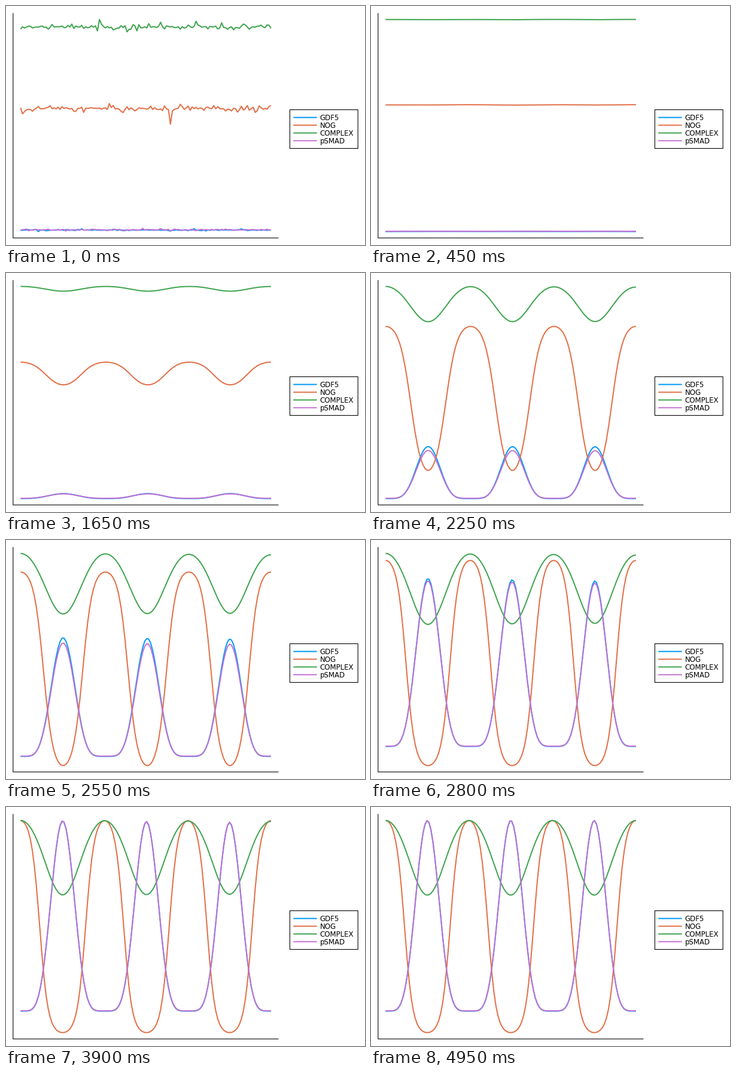
These frames come from a looping animation (600x400 px, 5050 ms). A matplotlib script:

```python
import numpy as np
import matplotlib.pyplot as plt
from matplotlib.animation import FuncAnimation
from matplotlib.patches import Rectangle

W, H, DPI = 600, 400, 100
PT = 72 / DPI                      # points per pixel
SLOT, SLOTS = 50, 101              # ms per drawn frame, frames per loop
STEP = 59.55                       # ms per simulation step
LAST = 83                          # last simulation step
N = 128
MARGIN, AXIS_END = 11.81, 455.4
PAD = 0.03 / 1.06                  # axis padding around the data

NAMES = ["GDF5", "NOG", "COMPLEX", "pSMAD"]
COLORS = ["#009AFA", "#E36F47", "#3EA44E", "#C371D2"]

left = MARGIN + PAD * (AXIS_END - MARGIN)
right = AXIS_END - PAD * (AXIS_END - MARGIN)
top = MARGIN + PAD * (H - 2 * MARGIN)
bottom = H - top
u = np.linspace(0, 1, N)
x = left + (right - left) * u

# Random start, smoothed over time by damping its cosine modes
rng = np.random.default_rng(5)
modes = np.arange(N)
basis = np.cos(np.pi * np.outer(modes + 0.5, modes) / N)


def noise_modes(reach):
    noise = rng.laplace(size=N)
    weights = basis.T @ (noise * reach / noise.max()) * 2 / N
    weights[0] = 0
    return weights


noises = [noise_modes(reach) for reach in (-2.6, 8.5, 13, 2.4)]


def residue(step, weights):
    return basis @ (weights * np.exp(-(0.2 + 0.006 * modes**2) * step))


def growth(step, level, rate, bend):
    """Saturating growth from 0 to 1, steepest around step 40."""
    t = step - 37
    return 1 / (1 + np.exp(-(level + rate * t + bend * t * t)))


def squash(c, gain, shift):
    """Bend a cosine through tanh and rescale it to 0..1."""
    low, high = np.tanh(gain * (shift - 1)), np.tanh(gain * (shift + 1))
    return (np.tanh(gain * (c + shift)) - low) / (high - low)


def levels(step):
    """Concentrations of the four species along the domain."""
    remaining = 1 - step / LAST
    grown = growth(step, -1.12, 0.283, 0.0022)
    grown_smad = growth(step, -1.23, 0.283, 0.0022)

    # The pattern starts slightly off its final place and height
    shift = 5.3 * remaining * np.sin(np.pi * u) / (right - left)
    wave = np.cos(6 * np.pi * (u - shift))
    crest = (1 + wave) / 2
    lag = remaining * grown * u
    fade = 1 - 0.055 * lag

    spot = (1 - crest) ** (1 + 1.65 * np.tanh(20 * grown)) * fade
    gdf = 354.8 * grown * spot
    smad = 0.5 + 354.8 * grown_smad * spot

    up = 143 * growth(step, 0.13, 0.2185, 0)
    down = 252 * growth(step, 0.64, 0.3155, 0.0015)
    bump = squash(wave, 0.5 + 0.95 * np.sqrt(grown), 0.62 - 0.8 * grown)
    nog = 212 - down + (up + down) * bump

    arch = crest + 0.3 * crest * (1 - crest)
    dip = 139 * growth(step, -0.3, 0.28, 0.003)
    cplx = 355 - dip * (1 - arch) * fade - 8 * lag * arch

    return np.array([v + residue(step, w)
                     for v, w in zip((gdf, nog, cplx, smad), noises)])


fig = plt.figure(figsize=(W / DPI, H / DPI), dpi=DPI, facecolor="white")
ax = fig.add_axes([0, 0, 1, 1])
ax.set_xlim(0, W)
ax.set_ylim(H, 0)
ax.axis("off")


def line(xs, ys, color, width):
    return ax.plot(xs, ys, color=color, lw=width * PT, snap=False,
                   solid_capstyle="butt", solid_joinstyle="round")[0]


line([MARGIN, MARGIN, AXIS_END], [MARGIN, H - MARGIN, H - MARGIN],
     "black", 1.1)
ax.add_patch(Rectangle((474.4, 173.6), 113.8, 64.8, fc="white", ec="black",
                       lw=1.1 * PT, snap=False))

curves = []
for i, (name, color) in enumerate(zip(NAMES, COLORS)):
    y = 186.56 + 12.96 * i
    line([480.2, 519.6], [y, y], color, 2)
    ax.text(524.5, y + 4.4, name, family="DejaVu Sans", size=11.8 * PT,
            color="black", va="baseline")
    curves.append(line(x, np.zeros(N), color, 2))


def draw(frame):
    values = levels(int(frame * SLOT / STEP))
    low, high = values.min(), values.max()
    # The vertical axis always fits the data
    ys = bottom - (bottom - top) * (values - low) / (high - low)
    for curve, y in zip(curves, ys):
        curve.set_ydata(y)
    return curves


anim = FuncAnimation(fig, draw, frames=SLOTS, interval=SLOT, repeat=True,
                     repeat_delay=0, init_func=lambda: draw(0))
plt.show()
```
